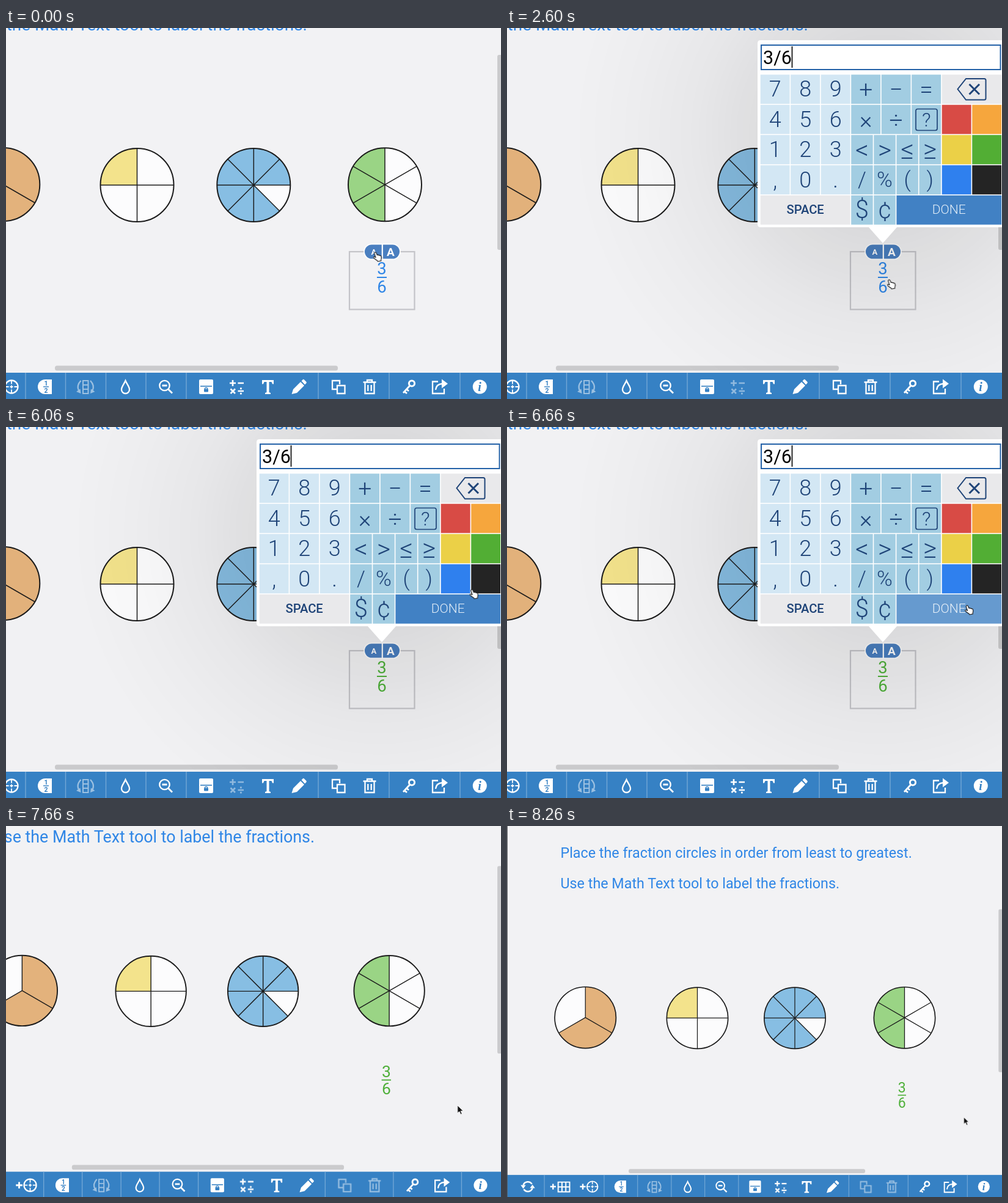
Animation of 810 by 607 pixels, one loop 9060 ms. Source, as an HTML page:

```html
<!DOCTYPE html>
<html lang="en">
<head>
<meta charset="utf-8">
<title>Labelling fraction circles</title>
<style>
  html, body { margin: 0; width: 100%; height: 100%; overflow: hidden; background: #f2f2f4; }
  svg { display: block; width: 810px; height: 607px; font-family: Roboto, sans-serif; }
  text { white-space: pre; }
  .mid { text-anchor: middle; }
  .icon { fill: none; stroke: #fff; stroke-width: 2.3; }
  .solid { fill: #fff; }
  .pie line { stroke: #1b1b1b; stroke-width: 1.5; }

  #zoom, #cursor, #panel, #caret, #hand, #arrow, #label, .selected, #math, .dims, .green, .done {
    animation: 9060ms step-end infinite;
  }
  #zoom { transform-origin: 806px 606px; animation-name: zoom; }
  #cursor { animation-name: move; animation-timing-function: ease-in-out; }
  #panel { animation-name: open; }
  #caret { animation-name: blink; }
  #hand { animation-name: hand; }
  #arrow { animation-name: arrow; }
  #label { animation-name: recolour; }
  .selected { animation-name: deselect; }
  .dims { animation-name: dim; }
  #math { animation-name: busy; }
  .green { animation-name: green; }
  .done { animation-name: done; }

  @keyframes zoom {
    0% { transform: none; }
    81.567% { transform: none; animation-timing-function: cubic-bezier(.37, 0, .63, 1); }
    90.839%, 100% { transform: scale(.836); }
  }
  @keyframes move {
    0%, 3.75% { transform: translate(600.5px, 366px); }
    6.3% { transform: translate(626px, 399px); }
    8.057%, 14% { transform: translate(620px, 410px); }
    16.887%, 19.9% { transform: translate(609px, 401px); }
    21.302% { transform: translate(637px, 426px); }
    22.075%, 25% { transform: translate(630px, 426px); }
    26.49% { transform: translate(609px, 408px); }
    27.152%, 36.865% { transform: translate(621.5px, 411px); }
    44.923%, 63.355% { transform: translate(775.5px, 195px); }
    66.887% { transform: translate(758.5px, 265px); }
    69.868%, 76.49% { transform: translate(749px, 291px); }
    80.132%, 100% { transform: translate(736px, 451px); }
  }
  @keyframes open {
    0%, 74.283% { visibility: hidden; }
    28.698% { visibility: visible; }
  }
  @keyframes blink {
    0%, 39.735%, 50.773%, 61.81%, 72.85% { opacity: 1; }
    34.547%, 45.585%, 56.623%, 67.66% { opacity: 0; }
  }
  @keyframes hand { 0% { opacity: 1; } 77.263%, 100% { opacity: 0; } }
  @keyframes arrow { 0% { opacity: 0; } 77.263%, 100% { opacity: 1; } }
  @keyframes recolour { 0% { color: #2f86e6; } 55.188%, 100% { color: #4fb03a; } }
  @keyframes deselect { 0% { opacity: 1; } 82.34%, 100% { opacity: 0; } }
  @keyframes dim { 0% { opacity: 1; } 82.34%, 100% { opacity: .5; } }
  @keyframes busy { 0%, 73.51%, 100% { opacity: 1; } 28.698% { opacity: .45; } }
  @keyframes green { 0%, 55.9%, 100% { opacity: 1; } 54.415% { opacity: .8; } }
  @keyframes done { 0%, 74.283%, 100% { opacity: 1; } 73.51% { opacity: .8; } }
</style>
</head>
<body>
<svg viewBox="0 0 810 607">
  <defs>
    <radialGradient id="shade" gradientUnits="userSpaceOnUse" cx="612" cy="173" r="505">
      <stop offset=".3" stop-opacity=".1"/>
      <stop offset=".42" stop-opacity=".078"/>
      <stop offset=".6" stop-opacity=".043"/>
      <stop offset=".8" stop-opacity=".02"/>
      <stop offset="1" stop-opacity=".004"/>
    </radialGradient>
  </defs>
  <rect width="810" height="607" fill="#f2f2f4"/>
  <g id="zoom">
    <g fill="#2f86e6" font-size="27.9">
      <text x="-53.5" y="-56.5">Place the fraction circles in order from least to greatest.</text>
      <text x="-53.5" y="3.5">Use the Math Text tool to label the fractions.</text>
    </g>
    <g id="pies"></g>
    <g fill="#cbcbcd">
      <rect x="804" y="44" width="9" height="319" rx="3"/>
      <rect x="80" y="552.5" width="463" height="8" rx="3.5"/>
    </g>

    <g class="selected">
      <rect x="562" y="366" width="106.5" height="94.5" fill="none" stroke="#c4c4c8" stroke-width="2.2"/>
      <rect x="585" y="352.5" width="61" height="27" rx="13.5" fill="#fff" opacity=".8"/>
      <rect x="587" y="354.5" width="57" height="23" rx="11.5" fill="#4a7fc0"/>
      <rect x="614.7" y="353" width="2.2" height="26" fill="#fff"/>
      <g class="mid" fill="#fff" font-weight="700">
        <text x="602" y="371" font-size="13">A</text>
        <text x="629.5" y="373" font-size="19">A</text>
      </g>
    </g>
    <g id="label" class="mid" fill="currentColor" font-size="27.5">
      <text x="615" y="403">3</text>
      <rect x="607" y="407" width="16" height="2"/>
      <text x="615" y="432.5">6</text>
    </g>

    <g id="panel">
      <rect x="0" y="0" width="810" height="564" fill="url(#shade)"/>
      <path d="M415 20H830V326H638L615 352 592 326H415Q410 326 410 321V25Q410 20 415 20Z" fill="#fff"/>
      <rect x="416" y="28" width="391.5" height="40" fill="#fff" stroke="#2462a8" stroke-width="2"/>
      <text x="419" y="58.5" font-size="30.5">3/6</text>
      <rect id="caret" x="465.7" y="30" width="1.6" height="35"/>
      <g id="keys" class="mid"></g>
      <g fill="none" stroke="#1f4478" stroke-width="2">
        <path d="M751 83H781Q783.5 83 783.5 85.5V115Q783.5 117.5 781 117.5H751L737.5 100Z"/>
        <path d="M756.5 92L773 108.5M773 92L756.5 108.5" stroke-width="3"/>
        <rect x="669" y="132.5" width="35" height="35" rx="3" stroke-width="1.7"/>
      </g>
    </g>

    <rect x="-158" y="564" width="990" height="60" fill="#3681c4"/>
    <g id="dividers" fill="#72a7d6"></g>
    <g class="icon">
      <g transform="translate(-117.3 587)">
        <path d="M-9 -3A9.5 9.5 0 0 1 8 -5M9 3A9.5 9.5 0 0 1 -8 5" stroke-width="3"/>
        <path class="solid" stroke="none" d="M-14 -3H-4L-9 4ZM14 3H4L9 -4Z"/>
      </g>
      <path d="M-73.5 587H-62.5M-68 581.5V592.5M-15.2 587H-4.2M-9.7 581.5V592.5" stroke-width="3"/>
      <path d="M-58 578H-35.5V597H-58ZM-58 587.5H-35.5M-50.5 578V597M-43 578V597"/>
      <circle cx="9" cy="587" r="10.5"/>
      <path d="M9 577V582.5M9 591.5V597M-1 587H4.5M13.5 587H19M9 584.5V589.5M6.5 587H11.5" stroke-width="1.8"/>
      <g opacity=".5">
        <path d="M126 577H134.5V598H126ZM126 584H134.5M126 591H134.5" stroke-width="2"/>
        <path d="M122.5 577Q115 585 119 593M138 577Q145.500 585 141.500 593"/>
        <path class="solid" stroke="none" d="M115 595L121.500 590.500 122.500 598ZM145.500 595L139 590.500 138 598Z"/>
      </g>
      <path d="M195.5 577C193 583 189 587 189 591.5A6.5 6.5 0 0 0 202 591.5C202 587 198 583 195.5 577Z"/>
      <circle cx="259.5" cy="585" r="8.2"/>
      <path d="M255.5 585H263.5M265.5 591L272 597.5" stroke-width="2.8"/>
      <g id="math" stroke-width="2.6">
        <path d="M366 581H376M371 576V586M379.5 581H389M367.5 590.5L375 598M375 590.5L367.5 598M379.5 594H389"/>
        <path class="solid" stroke="none" d="M383 588.5h2.8v2.8h-2.8zM383 596.8h2.8v2.8h-2.8z"/>
      </g>
      <path class="dims" d="M546 583V577H534V591H541M542 585H554.5V598H542Z"/>
      <path class="dims" d="M584.5 579.5H605.5M591 579V576H599V579M587.5 580V598H602.5V580M592.3 584V594M597.7 584V594"/>
      <circle cx="664" cy="581.5" r="4.6" stroke-width="3"/>
      <path d="M660.5 585.5L650 597M652 594.5L656 598M655.5 591L659 594" stroke-width="2.8"/>
      <path d="M707 578.5H698V598H717V590M703 592Q704 582.5 714 582"/>
      <path class="solid" stroke="none" d="M713 574.5L723 582 713 589.5Z"/>
    </g>
    <g fill="#fff">
      <path d="M75 575V599H64A12 12 0 0 1 64 575Z"/>
      <rect x="316" y="575" width="23" height="24" rx="2"/>
      <path d="M419 576H438V582.5H436L434.5 579H430.5V596L433 597V599H424V597L426.5 596V579H422.5L421 582.5H419Z"/>
      <path d="M467.5 599L470 591 482 579 488 585 476 597ZM483.5 577.5L486 575Q487 574.5 488 575.5L491.5 579Q492 580 491.5 581L489 583.5Z"/>
      <circle cx="775.3" cy="587" r="11.5"/>
    </g>
    <g fill="#3681c4" class="mid">
      <rect x="318" y="585.3" width="19" height="1.6"/>
      <rect x="324" y="590.5" width="7" height="5" rx="1"/>
      <circle cx="327.5" cy="590.5" r="2.2" fill="none" stroke="#3681c4" stroke-width="1.3"/>
      <rect x="61" y="586.3" width="9" height="1.4"/>
      <text x="65.5" y="585" font-size="10.5" font-weight="700">1</text>
      <text x="65.5" y="597" font-size="10.5" font-weight="700">2</text>
      <text x="775" y="594" font-size="20" font-weight="700" font-style="italic" font-family="Liberation Serif, serif">i</text>
    </g>
    <rect x="-158.5" y="-130" width="1.5" height="760" fill="#55575a"/>

    <g id="cursor">
      <g id="hand">
        <path transform="scale(.9)" fill="#fff" stroke="#222" stroke-width="1.3" stroke-linejoin="round" d="M3.2 1.6C4.3 .6 5.6 1 6 2.2L7.6 6.2C8.4 5.4 9.6 5.6 10 6.5C10.8 5.9 12 6.2 12.4 7.2C13.6 6.8 14.6 7.4 14.9 8.6C15.4 10.8 15.4 12.6 14.6 14.4L14.8 16.6 8.6 17.8 7.8 16C5.6 15.2 3.4 13 1.2 11.2C.2 10.2 1.4 8.8 2.8 9.3L5 10.4 2.6 3.4C2.4 2.6 2.6 2 3.2 1.6Z"/>
      </g>
      <path id="arrow" fill="#111" stroke="#fff" d="M0 0V13.5L3.2 10.6 5.4 15.6 7.8 14.6 5.7 9.8H10Z"/>
    </g>
  </g>
</svg>
<script>
  const $ = id => document.getElementById(id);
  const add = (id, markup) => $(id).insertAdjacentHTML('beforeend', markup);

  // Angles run clockwise from the right, in degrees.
  const R = 60;
  const rim = (x, y, deg) => {
    const a = deg * Math.PI / 180;
    return [x + R * Math.cos(a), y + R * Math.sin(a)];
  };

  function pie(x, y, parts, first, from, to, fill) {
    const large = to - from > 180 ? 1 : 0;
    let s = `<circle cx="${x}" cy="${y}" r="${R}" fill="#fcfcfd"/>`;
    s += `<path d="M${x} ${y}L${rim(x, y, from)}A${R} ${R} 0 ${large} 1 ${rim(x, y, to)}Z" fill="${fill}"/>`;
    for (let i = 0; i < parts; i++) {
      const [px, py] = rim(x, y, first + i * 360 / parts);
      s += `<line x1="${x}" y1="${y}" x2="${px}" y2="${py}"/>`;
    }
    s += `<circle cx="${x}" cy="${y}" r="${R}" fill="none" stroke="#1b1b1b" stroke-width="2"/>`;
    add('pies', `<g class="pie">${s}</g>`);
  }

  pie(-4.7, 256, 3, 30, -90, 150, '#e3b27c');
  pie(214.5, 257, 4, 0, 180, 270, '#f3e38c');
  pie(405.3, 257, 8, 0, 45, 360, '#87bee3');
  pie(620, 256.3, 6, 30, 90, 270, '#9ad485');

  const NAVY = '#1f4478', DIGIT = '#d3e7f4', SIGN = '#a2cde2', GREY = '#e9e9eb';
  const rowY = r => 76.3 + r * 49.4;

  function key(x, row, w, fill, label = '', o = {}) {
    const { size = 36, weight = 300, ink = NAVY, name = '', base = 36 } = o;
    const y = rowY(row);
    const safe = label.replace('<', '&lt;');
    add('keys', `<g class="${name}"><rect x="${x}" y="${y}" width="${w}" height="47.8" fill="${fill}"/>` +
      `<text x="${x + w / 2}" y="${y + base}" font-size="${size}" font-weight="${weight}" fill="${ink}">${safe}</text></g>`);
  }
  const run = (chars, x, row, step, fill, o) =>
    [...chars].forEach((c, i) => key(x + i * step, row, step - 1.6, fill, c, o));

  ['789', '456', '123', ',0.'].forEach((chars, row) => run(chars, 414.7, row, 49.5, DIGIT));
  run('+−=', 563.2, 0, 49.5, SIGN, { size: 39, base: 38 });
  run('×÷', 563.2, 1, 49.5, SIGN, { size: 39, base: 38 });
  run('?', 662.2, 1, 49.5, SIGN, { size: 32, base: 35 });
  run('<>≤≥', 563.2, 2, 37.1, SIGN, { size: 43, base: 39 });
  run('/%()', 563.2, 3, 37.1, SIGN, { size: 35, base: 35 });
  run('$¢', 563.2, 4, 37.1, SIGN, { size: 40, base: 37 });
  key(711.7, 0, 97.5, GREY);
  key(414.7, 4, 146.9, GREY, 'SPACE', { size: 20.2, weight: 500, base: 30 });
  key(637.4, 4, 171.8, '#4181c4', 'DONE', { size: 21, ink: '#e3eef8', base: 30, name: 'done' });

  ['#d84b45', '#f6a63d', '#ebd047', '#52ae34', '#2f80ee', '#242424'].forEach((fill, i) =>
    key(711.7 + i % 2 * 49.5, 1 + (i >> 1), 47.9, fill, '', { name: i === 3 ? 'green' : '' }));

  [-85, 32, 97.5, 163.5, 229, 295, 511, 627, 743].forEach(x =>
    add('dividers', `<rect x="${x - .7}" y="564" width="1.4" height="43"/>`));
</script>
</body>
</html>
```
